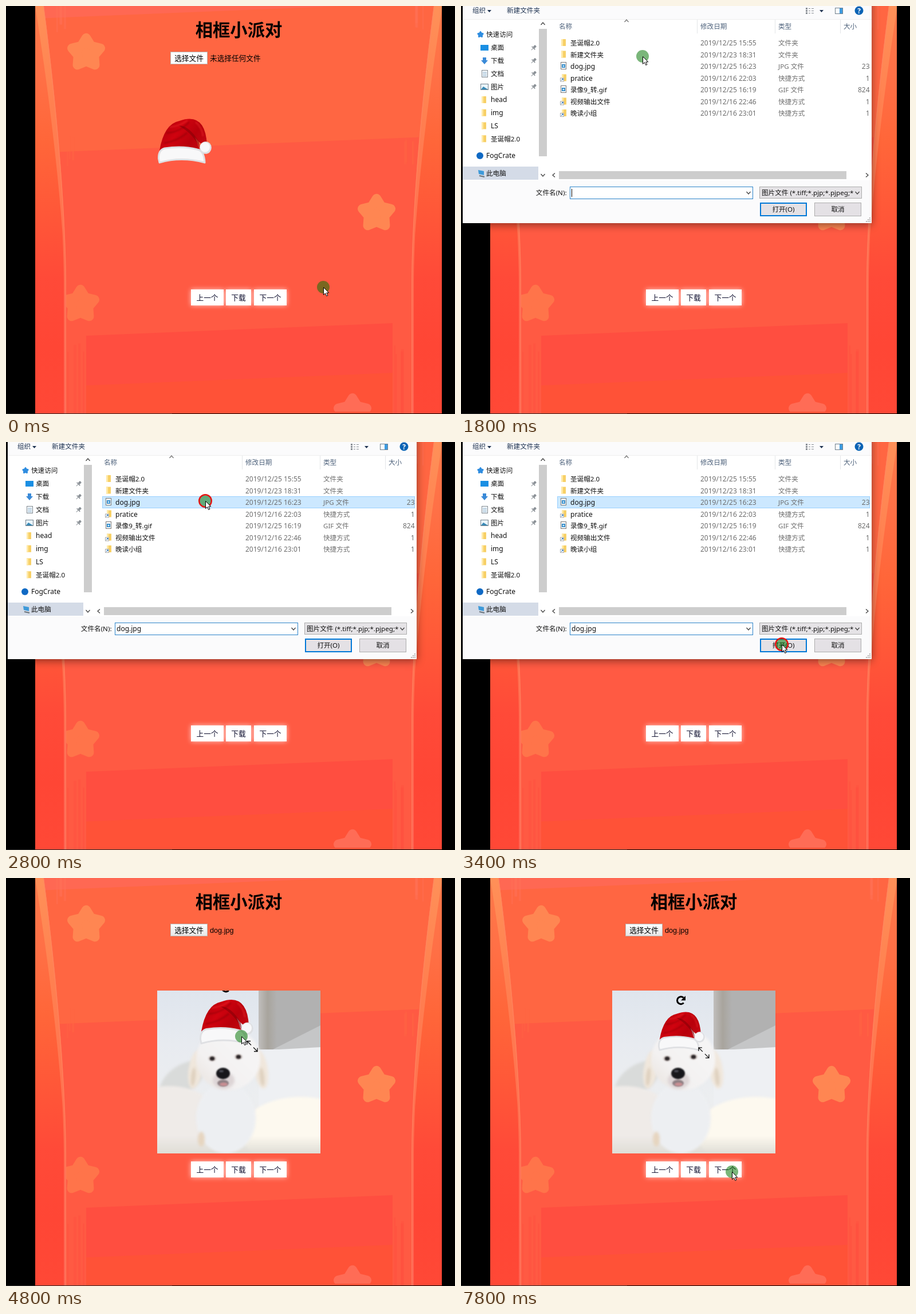
Write an HTML page with a canvas that moves like this. It is 784 by 714 pixels and loops after 8000 ms.

```html
<!DOCTYPE html>
<html lang="zh">
<head>
<meta charset="utf-8">
<title>相框小派对</title>
<style>
html, body { margin: 0; width: 100%; height: 100%; overflow: hidden; background: #000; }
canvas { display: block; }
</style>
</head>
<body>
<canvas id="stage" width="784" height="714"></canvas>
<script>
const ctx = document.getElementById('stage').getContext('2d');
const LOOP = 8000, STEP = 200;
const UI = '"Noto Sans", "Noto Sans CJK SC", "Noto Sans CJK", sans-serif';
const PAGE = '"Liberation Sans", "Noto Sans CJK SC", "Noto Sans CJK", sans-serif';
const SLOPE = .041;
const PHOTO = [264, 197, 285, 285];
const OPEN = 1800, LOADED = 3600, GRAB = 4000;
const clicks = [1400, 2800, 3400];

// Pointer stops: time, x, y
const stops = [
  [0, 554, 492], [800, 278, 284], [1000, 276, 147], [1200, 317, 86], [1800, 317, 88],
  [2000, 318, 145], [2200, 318, 145], [2800, 348, 103], [3400, 560, 354], [3600, 459, 298],
  [GRAB, 308, 238], [4600, 381, 253], [5000, 441, 301], [5800, 425, 286], [6200, 425, 286],
  [6400, 393, 219], [7000, 393, 235], [7800, 473, 514]
];

// Eased progress from a to b
function ramp(t, a, b) {
  const p = Math.min(1, Math.max(0, (t - a) / (b - a)));
  return p * p * (3 - 2 * p);
}
function pointerAt(t) {
  const i = stops.findIndex(s => s[0] > t);
  if (i < 0) return stops[stops.length - 1].slice(1);
  const [t0, x0, y0] = stops[i - 1], [t1, x1, y1] = stops[i];
  const p = ramp(t, t0, t1);
  return [x0 + (x1 - x0) * p, y0 + (y1 - y0) * p];
}
function hatAt(t) {
  const drag = ramp(t, GRAB, 4600), lower = ramp(t, 6400, 7000);
  return [312 + 73 * drag, 236.5 + 15.5 * drag + 16.5 * lower, 1 - .13 * ramp(t, 5000, 5800)];
}
function seeded(seed) {
  return () => (seed = seed * 16807 % 2147483647) / 2147483647;
}

function rect(x, y, w, h, fill, edge, lw = 1) {
  if (fill) { ctx.fillStyle = fill; ctx.fillRect(x, y, w, h); }
  if (edge) {
    ctx.strokeStyle = edge; ctx.lineWidth = lw;
    ctx.strokeRect(x + lw / 2, y + lw / 2, w - lw, h - lw);
  }
}
function oval(x, y, rx, ry, fill, turn = 0) {
  ctx.beginPath(); ctx.ellipse(x, y, rx, ry, turn, 0, 7);
  ctx.fillStyle = fill; ctx.fill();
}
function shape(d, fill) { ctx.fillStyle = fill; ctx.fill(new Path2D(d)); }
function line(d, color, w = 1) {
  ctx.strokeStyle = color; ctx.lineWidth = w; ctx.stroke(new Path2D(d));
}
function blend(x0, y0, x1, y1, ...colors) {
  const g = ctx.createLinearGradient(x0, y0, x1, y1);
  colors.forEach((c, i) => g.addColorStop(i / (colors.length - 1), c));
  return g;
}
const fade = (y0, y1, ...colors) => blend(0, y0, 0, y1, ...colors);

function text(s, x, y, font, color = '#000', align = 'left') {
  ctx.font = font; ctx.fillStyle = color; ctx.textAlign = align;
  ctx.fillText(s, x, y);
}
// Dialog label, centred vertically on y
function label(s, x, y, color = '#111', align) {
  const size = /[\u4e00-\u9fff]/.test(s) ? 11.6 : 12;
  text(s, x, y + 4.4, `${size}px ${UI}`, color, align);
}
function chevron(x, y, turn, color = '#444') {
  ctx.save(); ctx.translate(x, y); ctx.rotate(turn * Math.PI / 2);
  line('M-3.5 -2L0 2L3.5 -2', color, 1.3);
  ctx.restore();
}
function star(x, y, color, size = 1) {
  ctx.save(); ctx.translate(x, y); ctx.scale(size, size);
  ctx.beginPath();
  for (let i = 0; i < 10; i++) {
    const r = i % 2 ? 15 : 26.3, a = i * Math.PI / 5;
    ctx.lineTo(r * Math.sin(a), -r * Math.cos(a));
  }
  ctx.closePath();
  ctx.fillStyle = ctx.strokeStyle = color;
  ctx.lineWidth = 16; ctx.lineJoin = 'round';
  ctx.fill(); ctx.stroke();
  ctx.restore();
}

// Slanted block from y down to the page's end
function band(x, w, y, color) {
  shape(`M${x} ${y}L${x + w} ${y - w * SLOPE}V713H${x}Z`, color);
}
// Inner edge of the left curtain
const fold = y => 105 - 39 * Math.max(0, 1 - y / 480) ** 1.6;

function strip(left, right, fill) {
  ctx.beginPath();
  for (let y = 0; y <= 720; y += 20) ctx.lineTo(right(y), y);
  for (let y = 720; y >= 0; y -= 20) ctx.lineTo(left(y), y);
  ctx.fillStyle = fill; ctx.fill();
}
function curtain() {
  strip(() => 51, fold, fade(0, 713, '#ff7a4a', '#ff7046', '#ff6639', '#ff5838', '#ff4a38', '#ff4635', '#ff4836'));
  strip(y => fold(y) - 4 - 11 * Math.max(0, 1 - y / 400), fold,
    fade(0, 713, '#ff9058', '#ff8050', '#ff7450', '#ff6850', '#ff6452'));
  strip(y => fold(y) - 1.5, fold, 'rgba(255,134,100,.6)');
}
function streaks(x, w, y, h, color) {
  const rand = seeded(x * 31 + y + 7);
  for (let i = 0; i < 4; i++) rect(Math.round(x + rand() * w), y + rand() * 20, 2 + rand() * 3, h, color);
}

function backdrop() {
  rect(0, 0, 784, 714, '#000');
  ctx.save();
  ctx.beginPath(); ctx.rect(51, 0, 710, 713); ctx.clip();
  rect(51, 0, 711, 713, '#ff6853');
  band(51, 711, 22, '#ff6642');
  band(51, 711, 257, '#ff5a43');
  band(140, 535, 577, '#ff4e40');
  band(140, 535, 664, '#ff5237');
  for (const x of [106, 675]) streaks(x, 30, 590, 125, 'rgba(255,74,62,.35)');
  for (const x of [88, 714]) streaks(x, 14, -15, 45, 'rgba(255,112,88,.4)');
  for (const x of [106, 694]) streaks(x, 18, 225, 40, 'rgba(255,102,68,.35)');
  star(130, 522, '#ff744a');
  curtain();
  ctx.save(); ctx.translate(813, 0); ctx.scale(-1, 1); curtain(); ctx.restore();
  star(140, 82, '#ff8652');
  star(647, 363, '#ff8652');
  star(605, 712, '#ff6c56');
  rect(572, 710, 68, 4, '#ff5237');
  ctx.restore();
  rect(0, 713, 290, 1, '#2a2a2a');
}

function pageButton(s, x, w) {
  ctx.save();
  ctx.shadowColor = 'rgba(255,255,255,.7)'; ctx.shadowBlur = 9;
  rect(x, 496, w, 28, '#fff');
  ctx.restore();
  text(s, x + w / 2, 515, `12.7px ${PAGE}`, '#0c0c2c', 'center');
}
function controls(t) {
  const loaded = t >= LOADED;
  text('相框小派对', 406.5, 52.5, `bold 30.3px ${PAGE}`, '#000', 'center');
  rect(287, 80, 65, 22, loaded ? fade(80, 102, '#fff', '#e6e6e6') : '#fff',
    t >= 1200 && !loaded ? '#8a8a8a' : '#bcb6b3');
  text('选择文件', 319.5, 95.5, `12.7px ${PAGE}`, '#000', 'center');
  text(loaded ? 'dog.jpg' : '未选择任何文件', 356, 95.5, `12.67px ${PAGE}`);
  pageButton('上一个', 323, 57);
  pageButton('下载', 384, 44);
  pageButton('下一个', 433, 57);
}

function room() {
  rect(...PHOTO, fade(197, 482, '#dfe5ed', '#e8ebf0', '#eceef0', '#eeece9'));
  rect(441, 197, 108, 103, '#b1b1b1');
  rect(441, 197, 32, 103, blend(441, 0, 473, 0, '#c0bebc', '#a8a49d', '#b1b1b1'));
  shape('M549 258V300H466Z', '#c5c6c7');
  shape('M441 302L549 296V400H441Z', '#eef0f3');
  ctx.filter = 'blur(2px)';
  oval(308, 352, 44, 24, '#d9dbda', -.6);
  oval(285, 430, 90, 66, '#efebe8');
  oval(515, 445, 105, 62, '#fdf9ef');
  rect(260, 452, 295, 40, fade(452, 482, 'rgba(223,221,214,0)', '#dfddd6'));
}
function dog() {
  oval(384, 420, 52, 62, '#edeff2');
  oval(341, 457, 6, 13, '#e6d5c0');
  for (const side of [-1, 1]) {
    oval(388 + side * 57, 335, 12, 34, '#f0e7dc', -side * .16);
    oval(387 + side * 60, 348, 4, 16, '#dfd1bf', -side * .1);
  }
  oval(388, 317, 56, 54, blend(335, 365, 400, 300, '#e9e3de', '#f3f1f1', '#f5f4f4'));
  oval(380, 354, 19, 15, '#ddd5d6');
  ctx.filter = 'blur(.8px)';
  for (const side of [-1, 1]) {
    const x = 383 + side * 23, y = 314.5 - side * 1.5;
    oval(x, y, 7, 5, '#d0c7c4');
    oval(x, y, 4.2, 3.6, '#2a2426');
  }
  oval(379, 359, 10, 6, '#8f8084');
  oval(380, 361, 7, 3, '#c98e92');
  oval(379, 342, 12, 10, '#17171b');
  oval(376, 338, 4, 2, '#4a4b54');
}
function photo() {
  ctx.save();
  room();
  dog();
  ctx.restore();
}

function hat(x, y, s) {
  ctx.save();
  ctx.translate(x, y); ctx.scale(s, s); ctx.translate(-312, -236.5);
  shape('M268 253Q276 206 303 201Q348 185 351 243H343Q333 235 330 229L339 254Z',
    blend(275, 205, 345, 252, '#b4000b', '#d0030f', '#b8000b', '#c50813'));
  shape('M301 209Q320 209 337 238L339 252Q330 225 301 209Z', 'rgba(135,0,8,.6)');
  ctx.filter = 'blur(1px)';
  line('M280 222Q302 222 320 203M276 240Q300 236 316 222', 'rgba(125,0,8,.35)', 3);
  line('M286 212Q304 210 317 200M331 203Q342 212 344 228', 'rgba(235,40,44,.45)', 3);
  ctx.filter = 'none';
  const brim = 'M266.5 267Q266 252 277 249Q308 244 334 251Q346 253 347 274Q306 263 268 274Z';
  ctx.lineJoin = 'round';
  shape(brim, '#f8f8f9'); line(brim, '#dfe0e3', 3);
  oval(348.5, 248, 10.3, 10.8, '#dfe0e3');
  oval(347.5, 247, 8.5, 8.8, '#f8f8fa');
  ctx.restore();
}
function handles(x, y, s) {
  ctx.save();
  ctx.translate(x - 1, y - 39.5 * s - 20);
  ctx.beginPath(); ctx.arc(0, 0, 6.5, .75, 5.5);
  ctx.strokeStyle = '#000'; ctx.lineWidth = 3; ctx.stroke();
  shape('M8 -8V0H0Z', '#000');
  ctx.restore();
  ctx.save();
  ctx.translate(x + 47 * s - 2, y + 39.5 * s + 3);
  for (const turn of [0, Math.PI]) {
    ctx.rotate(turn);
    line('M2 2L9 9M9 3V9H3', '#111', 1.3);
  }
  ctx.restore();
}

function folder(x, y) {
  rect(x - 4, y - 6, 8, 12, '#f7d067');
  rect(x - 4, y - 6, 3, 12, '#ffe9a6');
}
function fileIcon(x, y) {
  rect(x - 5, y - 7, 10, 13, '#fff', '#777');
  rect(x - 3, y - 3, 6, 6, '#2b86c5');
  oval(x, y, 1.5, 1.5, '#d7efff');
}
function shortcut(x, y) {
  folder(x + 1, y);
  rect(x - 6, y, 7, 7, '#fff', '#aaa');
  line(`M${x - 4} ${y + 5}L${x - 1} ${y + 2}M${x - 3} ${y + 2}H${x - 1}V${y + 4}`, '#1264b0');
}

const files = [
  ['圣诞帽2.0', '25 15:55', '文件夹', '', folder],
  ['新建文件夹', '23 18:31', '文件夹', '', folder],
  ['dog.jpg', '25 16:23', 'JPG 文件', '23', fileIcon],
  ['pratice', '16 22:03', '快捷方式', '1', shortcut],
  ['录像9_转.gif', '25 16:19', 'GIF 文件', '824', fileIcon],
  ['视频输出文件', '16 22:46', '快捷方式', '1', shortcut],
  ['晚读小组', '16 23:01', '快捷方式', '1', shortcut]
];
const places = ['桌面', '下载', '文档', '图片', 'head', 'img', 'LS', '圣诞帽2.0'];

function pin(x, y) {
  ctx.save(); ctx.translate(x, y); ctx.rotate(Math.PI / 4);
  rect(-2, -5, 4, 5, '#8b9197'); rect(-4, 0, 8, 1.5, '#8b9197'); rect(-.5, 1, 1, 5, '#8b9197');
  ctx.restore();
}
function sidebar() {
  star(34, 50, '#2f8de0', .17);
  label('快速访问', 44, 50);
  places.forEach((s, i) => {
    const y = 73 + i * 22.75;
    label(s, 52, y);
    if (i < 4) pin(127, y); else folder(40, y);
  });
  rect(34, 68, 14, 10, '#1a8fe3');
  shape('M38 90H44V95H47L41 102L35 95H38Z', '#3a8ad8');
  rect(36, 112, 11, 13, '#fff', '#7c8790');
  line('M38 116H45M38 119H45M38 122H45', '#6d9cc0');
  rect(34, 136, 14, 11, '#e9f4fb', '#74828c');
  shape('M35 146L39 141L47 146Z', '#3889b5');
  oval(33, 262, 6, 6, '#0f69c4');
  label('FogCrate', 44, 262);
  rect(3, 281, 132, 23, '#d4dbe7');
  shape('M30 287L40 289V296L31 294Z', '#3e9ad9');
  line('M32 297L41 299', '#68727a', 2);
  label('此电脑', 44, 293);
  rect(136, 40, 14, 223, '#cdcdcd');
  chevron(143, 31, 2); chevron(143, 296, 0);
}

function toolbar() {
  rect(3, 0, 714, 23, '#fbfbfc');
  rect(3, 23, 714, 1, '#eeeeef');
  label('组织', 20, 8, '#1e3250');
  label('新建文件夹', 80, 8, '#1e3250');
  for (const x of [46, 626]) shape(`M${x} 7h7l-3.5 4Z`, '#1e3250');
  for (let y = 3; y < 14; y += 4) {
    rect(602, y, 3, 3, '#8a8f95');
    rect(607, y + 1, 3, 1, '#8a8f95'); rect(612, y + 1, 4, 1, '#8a8f95');
  }
  rect(653, 3, 14, 11, '#fff', '#70808c');
  rect(661, 4, 5, 9, '#3d9be0');
  oval(695, 8, 7.5, 7.5, '#0863b5');
  text('?', 695, 12.5, `bold 12px ${UI}`, '#fff', 'center');
}

function fileList(picked, hover) {
  const heads = { 名称: 171, 修改日期: 418, 类型: 554, 大小: 668 };
  for (const [s, x] of Object.entries(heads)) {
    label(s, x, 36, '#4c607a');
    if (x > 171) rect(x - 6, 24, 1, 24, '#e3e5e8');
  }
  chevron(289, 26, 2, '#777');
  files.forEach(([name, date, kind, size, icon], i) => {
    const y = 65 + i * 20.5, top = Math.round(y - 11);
    if (picked && i === 2) rect(168, top, 546, 21, '#cce8ff', '#99d1ff');
    else if (i === hover) rect(168, top, 546, 21, '#e5f3ff');
    icon(179, y - 1);
    label(name, 191, y);
    label('2019/12/' + date, 418, y, '#6d6d6d');
    label(kind, 554, y, '#6d6d6d');
    label(size, 713.5, y, '#6d6d6d', 'right');
  });
  rect(171, 289, 502, 14, '#cdcdcd');
  chevron(162, 296, 1); chevron(709, 296, 3);
}

function dialog(t, [, my]) {
  const picked = t >= 2800;
  const row = Math.floor((my - 54) / 20.5);
  ctx.save();
  ctx.shadowColor = 'rgba(0,0,0,.45)'; ctx.shadowBlur = 14; ctx.shadowOffsetY = 3;
  rect(3, -20, 714, 400, '#fff');
  ctx.restore();
  toolbar();
  sidebar();
  fileList(picked, t >= 2000 && t < 3200 ? row : -1);
  rect(3, 305, 714, 75, '#fbfbfc');
  label('文件名(N):', 184.5, 327, '#111', 'right');
  rect(190, 316, 320, 22, '#fff', '#2a83c9');
  if (picked) label('dog.jpg', 193, 327);
  else rect(193, 320, 1, 14, '#000');
  chevron(502, 327, 0);
  rect(521, 316, 179, 21, '#e5e3e6', '#adadad');
  label('图片文件 (*.tiff;*.pjp;*.pjpeg;*', 525, 327);
  chevron(692, 327, 0);
  rect(522, 344, 82, 24, '#e4e1e5', '#0078d7', 2);
  label('打开(O)', 563, 356, '#111', 'center');
  rect(617, 344, 82, 24, '#e4e1e5', '#adadad');
  label('取消', 658, 356, '#111', 'center');
  for (let i = 0; i < 3; i++)
    for (let j = 0; j <= i; j++) rect(713 - j * 3, 370 + i * 3, 2, 2, '#b5b5b5');
}

function pointer([x, y], pressed) {
  oval(x, y, 11, 11, 'rgba(0,115,0,.52)');
  if (pressed) {
    ctx.beginPath(); ctx.arc(x, y, 10.8, 0, 7);
    ctx.strokeStyle = '#e51212'; ctx.lineWidth = 2.4; ctx.stroke();
  }
  ctx.save(); ctx.translate(x + .5, y + .5);
  const arrow = 'M0 0V13L3 10.2L5.2 15L7.4 14L5.3 9.4H9.3Z';
  shape(arrow, '#fff'); line(arrow, '#000');
  ctx.restore();
}

function draw(t) {
  const mouse = pointerAt(t), pose = hatAt(t);
  backdrop();
  controls(t);
  ctx.save();
  ctx.beginPath(); ctx.rect(...PHOTO); ctx.clip();
  if (t >= LOADED) photo();
  hat(...pose);
  if (t >= GRAB) handles(...pose);
  ctx.restore();
  if (t >= OPEN && t < LOADED) dialog(t, mouse);
  pointer(mouse, clicks.includes(t));
}

const start = performance.now();
let shown = -1;
function tick() {
  const t = Math.floor((performance.now() - start) % LOOP / STEP) * STEP;
  if (t !== shown) draw(shown = t);
  requestAnimationFrame(tick);
}
tick();
</script>
</body>
</html>
```
